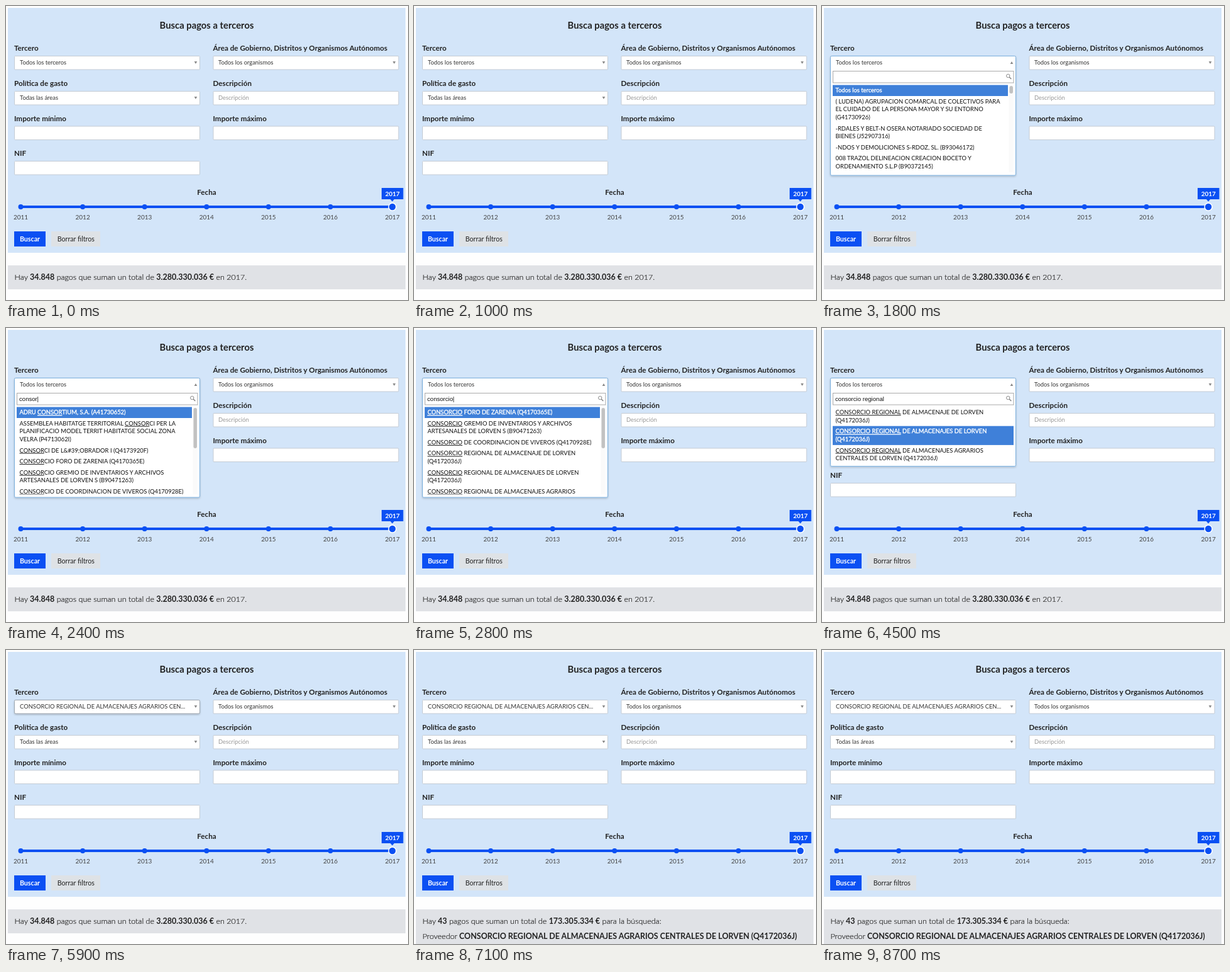
An HTML page for the animation above (8800 ms loop, 640 by 467 pixels).

```html
<!DOCTYPE html>
<html lang="es">
<head>
<meta charset="utf-8">
<title>Busca pagos a terceros</title>
<style>
html, body { margin: 0; width: 100%; height: 100%; overflow: hidden; background: #fefefe; }
svg { display: block; width: 640px; height: 467px; font-family: Lato, sans-serif; }
text { white-space: pre; }
.title { font-size: 14.8px; font-weight: 700; fill: #222; }
.label { font-size: 11.66px; font-weight: 700; fill: #222; }
.field { font-size: 9.4px; fill: #333; }
.option { font-size: 9.4px; fill: #111; }
.option.on { fill: #fff; stroke: #fff; stroke-width: .35px; }
.hint { font-size: 9.4px; fill: #999; }
.year { font-size: 10px; fill: #444; }
.tip { font-size: 10px; font-weight: 700; fill: #fff; }
.button { font-size: 10.7px; }
.query { font: 9.6px "Liberation Sans", Arial, sans-serif; fill: #111; }
.sum { font-size: 12.5px; font-weight: 300; fill: #222; stroke: #222; stroke-width: .2px; }
.sum .b { font-weight: 700; stroke: none; }
.u { text-decoration: underline; }
</style>
</head>
<body>
<svg id="stage" viewBox="0 0 640 467">
  <defs>
    <clipPath id="list"><rect x="15" y="125" width="293" height="139.5"/></clipPath>
    <filter id="glow" x="-10%" y="-10%" width="120%" height="125%">
      <feDropShadow dx="0" dy="1.5" stdDeviation="1.8" flood-color="#000" flood-opacity=".2"/>
    </filter>
  </defs>
  <g id="form"></g>
  <g id="summary"></g>
  <g id="select"></g>
</svg>
<script>
const LOOP = 8800;
const BLUE = '#0b50f3';
const OPEN = 1200, PICK = 5200, BLUR = 6400, RESULT = 6900;
const LINE = 12.7, PAD = 4.8, LIST_TOP = 126, LIST_MAX = 138.5;
const QUERY = 'consorcio regional';
const CHOSEN = 'CONSORCIO REGIONAL DE ALMACENAJES AGRARIOS CENTRALES DE LORVEN';

const options = [
  'Todos los terceros',
  '( LUDENA) AGRUPACION COMARCAL DE COLECTIVOS PARA|EL CUIDADO DE LA PERSONA MAYOR Y SU ENTORNO|(G41730926)',
  '-RDALES Y BELT-N OSERA NOTARIADO SOCIEDAD DE|BIENES (J52907316)',
  '-NDOS Y DEMOLICIONES S-RDOZ, SL. (B93046172)',
  '008 TRAZOL DELINEACION CREACION BOCETO Y|ORDENAMIENTO S.L.P (B90372145)',
  'ADRU CONSORTIUM, S.A. (A41730652)',
  'ASSEMBLEA HABITATGE TERRITORIAL CONSORCI PER LA|PLANIFICACIO MODEL TERRIT HABITATGE SOCIAL ZONA|VELRA (P4713062I)',
  'CONSORCI DE L&#39;OBRADOR I (Q4173920F)',
  'CONSORCIO FORO DE ZARENIA (Q4170365E)',
  'CONSORCIO GREMIO DE INVENTARIOS Y ARCHIVOS|ARTESANALES DE LORVEN S (B90471263)',
  'CONSORCIO DE COORDINACION DE VIVEROS (Q4170928E)',
  'CONSORCIO REGIONAL DE ALMACENAJE DE LORVEN|(Q4172036J)',
  'CONSORCIO REGIONAL DE ALMACENAJES DE LORVEN|(Q4172036J)',
  'CONSORCIO REGIONAL DE ALMACENAJES AGRARIOS|CENTRALES DE LORVEN (Q4172036J)'
];

const el = id => document.getElementById(id);
const esc = s => s.replace(/&/g, '&amp;');
const rect = (x, y, w, h, fill, extra = '') =>
  `<rect x="${x}" y="${y}" width="${w}" height="${h}" fill="${fill}" ${extra}/>`;
const text = (x, y, cls, s, extra = '') => `<text x="${x}" y="${y}" class="${cls}" ${extra}>${s}</text>`;
const mid = 'text-anchor="middle"';
const box = (x, y) => rect(x + .5, y + .5, 295, 21.5, '#fff', 'stroke="#c3cbd4" rx="1"');
const arrow = (x, y, up) =>
  `<path d="M${x - 2.3} ${y + (up ? 2 : -2)}h4.6l-2.3 ${up ? -4 : 4}z" fill="#888"/>`;

function formMarkup() {
  let s = rect(3, 3, 633, 389, '#d3e5f9') + text(319.5, 36, 'title', 'Busca pagos a terceros', mid);
  const rows = [79, 135, 190.5, 246];
  const left = ['Tercero', 'Política de gasto', 'Importe mínimo', 'NIF'];
  const right = ['Área de Gobierno, Distritos y Organismos Autónomos', 'Descripción', 'Importe máximo'];
  const add = (x, names) => names.forEach((name, i) => {
    s += text(x, rows[i] - 8, 'label', name) + box(x, rows[i]);
  });
  add(13, left);
  add(329.5, right);
  s += text(22, 149, 'field', 'Todas las áreas') + arrow(302, 146);
  s += text(338, 93, 'field', 'Todos los organismos') + arrow(618, 90);
  s += text(338, 149, 'hint', 'Descripción');
  s += text(319.5, 300, 'label', 'Fecha', mid) + rect(23, 317, 592, 4, BLUE);
  for (let i = 0; i < 7; i++) {
    const x = 23.5 + 98.6 * i;
    s += i < 6 ? `<circle cx="${x}" cy="319" r="4" fill="${BLUE}"/>`
      : `<circle cx="${x}" cy="319" r="6" fill="${BLUE}" stroke="#fff" stroke-width="1.5"/>`;
    s += text(x, 339, 'year', 2011 + i, mid);
  }
  s += rect(598, 289, 34.5, 18, BLUE) + `<path d="M611.5 306.5h7l-3.5 4z" fill="${BLUE}"/>`;
  s += text(615.3, 302, 'tip', '2017', mid);
  s += rect(13, 358, 50, 24, BLUE) + text(38, 374, 'button', 'Buscar', mid + ' fill="#fff" font-weight="700"');
  s += rect(72, 358, 78, 24, '#dee2e6') + text(111.3, 374, 'button', 'Borrar filtros', mid + ' fill="#222"');
  return s;
}

function summaryMarkup(done) {
  const b = s => `<tspan class="b">${s}</tspan>`;
  const line = (y, s) => text(13.5, y, 'sum', s);
  if (!done) {
    return rect(3, 412, 633, 38, '#e0e2e6') +
      line(435.3, `Hay ${b('34.848')} pagos que suman un total de ${b('3.280.330.036 €')} en 2017.`);
  }
  return rect(3, 412, 633, 55, '#e0e2e6') +
    line(435.3, `Hay ${b('43')} pagos que suman un total de ${b('173.305.334 €')} para la búsqueda:`) +
    line(459, `Proveedor ${b(CHOSEN + ' (Q4172036J)')}`);
}

function optionLine(s, query) {
  const at = query ? s.toLowerCase().indexOf(query) : -1;
  if (at < 0) return esc(s);
  const end = at + query.length;
  return `${esc(s.slice(0, at))}<tspan class="u">${esc(s.slice(at, end))}</tspan>${esc(s.slice(end))}`;
}

function menuMarkup({ query, hover, caret }) {
  const items = options
    .filter((o, i) => query ? i && o.toLowerCase().includes(query) : true)
    .map(o => o.split('|'));
  const height = items.reduce((h, lines) => h + lines.length * LINE + PAD, 0);
  const long = height > LIST_MAX;
  const bottom = long ? 269 : LIST_TOP + height + 3;
  let s = rect(13.5, 79.5, 295, bottom - 79.5, '#fff', 'stroke="#7cb1e0" rx="2" filter="url(#glow)"');
  s += text(22, 93, 'field', 'Todos los terceros') + arrow(302, 90, true);
  s += rect(17.5, 103.5, 287.5, 18.5, '#fff', 'stroke="#aaa"');
  s += '<g fill="none" stroke="#888"><circle cx="296.3" cy="111" r="2.7"/><path d="M298.3 113l3 3" stroke-width="1.6"/></g>';
  s += text(21, 116, 'query', query + (caret ? '<tspan dx="-.3" dy="-.5">|</tspan>' : ''));
  s += '<g clip-path="url(#list)">';
  let y = LIST_TOP;
  items.forEach((lines, i) => {
    const on = i === hover;
    const h = lines.length * LINE + PAD;
    if (on) s += rect(17, y - .5, long ? 279 : 288, h, '#3f80d9');
    lines.forEach((line, k) => {
      s += text(21.5, y + 11.2 + k * LINE, on ? 'option on' : 'option', optionLine(line, query));
    });
    y += h;
  });
  s += '</g>';
  if (long) {
    s += rect(297.5, 126, 7, 138, '#fafafa');
    s += rect(298.5, 127, 5.5, Math.min(64, 12 + 9 * query.length), '#c2c2c2', 'rx="2.7"');
  }
  return s;
}

function selectMarkup(state) {
  if (state.open) return menuMarkup(state);
  const focus = state.focus ? rect(13.5, 79.5, 295, 21.5, '#fff', 'stroke="#9fa8b2" rx="2" filter="url(#glow)"') : '';
  const value = state.picked ? CHOSEN.slice(0, 46) + '...' : 'Todos los terceros';
  return focus + text(22, 93, 'field', value) + arrow(302, 90);
}

function typed(t) {
  if (t < 1850) return 0;
  if (t < 2450) return Math.min(6, 1 + Math.floor((t - 1850) / 100));
  return Math.min(QUERY.length, 6 + Math.floor((t - 2400) / 108));
}

function stateAt(t) {
  return {
    open: t >= OPEN && t < PICK,
    picked: t >= PICK,
    focus: t >= PICK && t < BLUR,
    done: t >= RESULT,
    query: QUERY.slice(0, typed(t)),
    hover: t < 4200 ? 0 : t < 4800 ? 1 : 2,
    caret: t >= 1850 && t < 4200
  };
}

let shown = '';
function draw(t) {
  const state = stateAt(t);
  const key = JSON.stringify(state);
  if (key === shown) return;
  shown = key;
  el('select').innerHTML = selectMarkup(state);
  el('summary').innerHTML = summaryMarkup(state.done);
}

el('form').innerHTML = formMarkup();
const start = performance.now();
function tick() {
  draw((performance.now() - start) % LOOP);
  requestAnimationFrame(tick);
}
draw(0);
tick();
</script>
</body>
</html>
```
